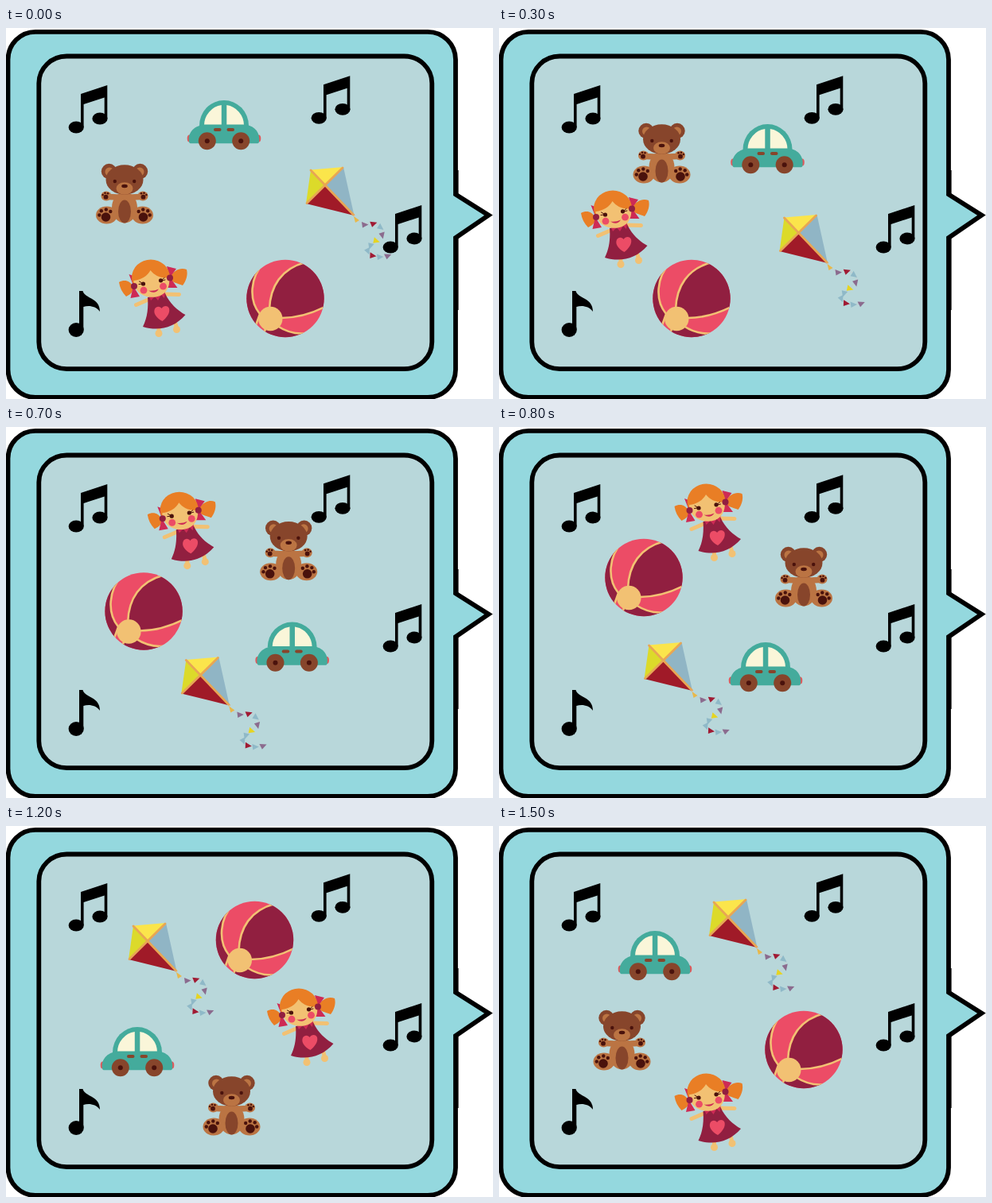
An HTML page that plays this animation: 612x467 px, repeating every 1.6 s.

```html
<!DOCTYPE html>
<html lang="en">
<head>
<meta charset="utf-8">
<title>Toys going round</title>
<style>
  html, body { margin: 0; width: 100%; height: 100%; overflow: hidden; background: #fff; }
  svg { display: block; width: 100vw; height: 100vh; }
  .teal { fill: #44ab9c } .cream { fill: #faf6d9 } .brown { fill: #87452b } .tan { fill: #bb7443 }
  .dark { fill: #4a120c } .hair { fill: #e97e25 } .skin { fill: #f2c173 } .wine { fill: #911f40 }
  .pink { fill: #ec4c66 } .bow { fill: #ce2a55 }
  .seam { stroke: #f2c173; stroke-width: 2.6 }
  .line { fill: none; stroke-linecap: round }
</style>
</head>
<body>
<svg viewBox="0 0 612 467" preserveAspectRatio="none">
  <defs>
    <clipPath id="disc"><circle cx="351" cy="340.5" r="48.7"/></clipPath>
    <g id="pair">
      <path d="M94 83L127.300 72V114H123.700V87.500L97.600 96V125H94Z"/>
      <ellipse cx="88.200" cy="125" rx="9.600" ry="7.400"/>
      <ellipse cx="118" cy="114" rx="9.600" ry="7.400"/>
    </g>
    <g id="paw">
      <ellipse class="tan" cx="126" cy="211.500" rx="6.500" ry="6"/>
      <circle class="dark" cx="125.500" cy="212.700" r="2.900"/>
      <circle class="dark" cx="121.600" cy="210" r="1.300"/>
      <circle class="dark" cx="124.500" cy="207.800" r="1.300"/>
      <circle class="dark" cx="128" cy="208.300" r="1.300"/>
      <ellipse class="tan" cx="126.500" cy="235.500" rx="13.500" ry="11"/>
      <circle class="dark" cx="125.500" cy="238" r="5.800"/>
      <circle class="dark" cx="117.300" cy="235.500" r="2.200"/>
      <circle class="dark" cx="119.800" cy="230.300" r="2.200"/>
      <circle class="dark" cx="125.800" cy="228.500" r="2.200"/>
      <circle class="dark" cx="131.300" cy="231" r="2.200"/>
      <circle class="brown" cx="129.500" cy="180.500" r="9.700"/>
      <circle class="tan" cx="130" cy="181" r="5.500"/>
    </g>
  </defs>

  <g stroke="#000" stroke-width="5.800">
    <path fill="#94d8de" d="M37 4.800H530A35 35 0 0 1 565 39.800V209.500L606.500 235.700L565 264V430A35 35 0 0 1 530 465H37A34.500 35 0 0 1 2.500 430V39.800A34.500 35 0 0 1 37 4.800Z"/>
    <path stroke-width="1.200" d="M568 179V210M568 265V355"/>
    <rect fill="#b8d7da" x="41.300" y="35.500" width="494" height="393.700" rx="35" ry="34"/>
  </g>

  <g id="car">
    <path class="teal" d="M243 123A31 32 0 0 1 305 123Z"/>
    <path class="cream" d="M249 122.500A25.500 26 0 0 1 270.800 97V122.500ZM277.300 97A25.500 26 0 0 1 299 122.500H277.300Z"/>
    <ellipse cx="230.500" cy="139" rx="2.800" ry="4.500" fill="#e0585b"/>
    <ellipse cx="317.500" cy="139" rx="2.800" ry="4.500" fill="#e0585b"/>
    <path class="teal" d="M230 143C228 131 238 121.500 252 121.500H298C311 121.500 320 131 318 143Q318 145.300 315 145.300H233Q230 145.300 230 143Z"/>
    <rect class="brown" x="261" y="126" width="9.500" height="4" rx="2"/>
    <rect class="brown" x="277.500" y="126" width="9.500" height="4" rx="2"/>
    <circle class="brown" cx="252.800" cy="142.300" r="11"/><circle class="dark" cx="252.800" cy="142.300" r="3"/>
    <circle class="brown" cx="295.200" cy="142.300" r="11"/><circle class="dark" cx="295.200" cy="142.300" r="3"/>
  </g>

  <g id="bear">
    <path class="line" stroke="#bb7443" stroke-width="7.500" d="M129 212.500Q149 214 169 212.500"/>
    <ellipse class="tan" cx="149" cy="226" rx="16" ry="19.500"/>
    <ellipse class="brown" cx="149" cy="231" rx="8" ry="14.500"/>
    <use href="#paw"/>
    <use href="#paw" transform="matrix(-1 0 0 1 298 0)"/>
    <ellipse class="brown" cx="149" cy="191" rx="23.500" ry="18.700"/>
    <ellipse class="tan" cx="149" cy="202" rx="10.500" ry="7.800"/>
    <ellipse class="dark" cx="149" cy="199" rx="3.800" ry="2.200"/>
    <circle class="dark" cx="136.800" cy="193" r="2.200"/>
    <circle class="dark" cx="161.200" cy="193" r="2.200"/>
  </g>

  <g id="doll">
    <path class="hair" d="M160 326C156 318 149 316 142 320C143 327 146 333 151 338C157 335 160 332 160 326ZM206 314C211 304 220 301 227 304C229 311 226 319 222 324C215 321 208 321 206 314Z"/>
    <path class="bow" d="M160 324L154.500 310L168 315ZM160 325L156.500 340L168 338ZM206 314L202 300L214 303ZM206 314L203 327L215.500 327Z"/>
    <path class="line" stroke="#f2c173" stroke-width="5" d="M181 341L163.500 348.500M199 335L217.500 335.500M192 376V385M213 372L215 380"/>
    <ellipse class="skin" cx="192" cy="384.500" rx="4.500" ry="4.500"/>
    <ellipse class="skin" cx="214.500" cy="379.500" rx="4.500" ry="4.500"/>
    <path class="wine" d="M178 339L200 334C205 346 216 356 225.500 361C211 378 191 382 172 376C178 364 179 351 178 339Z"/>
    <path class="bow" d="M179 336L182 343L187 338L191 343L195 336L199 340L200 332Z"/>
    <ellipse class="hair" cx="182" cy="314" rx="24" ry="22.500"/>
    <path class="skin" d="M160.500 318C170 317 178 312 181.500 305C187 312 196 316 205 314C207 329 198 338.500 184.500 338.800C171 339 161 331 160.500 318Z"/>
    <circle class="wine" cx="161" cy="325" r="4"/>
    <circle class="wine" cx="206" cy="314.500" r="4"/>
    <path class="line" stroke="#4a120c" stroke-width="1" d="M171 321L167.500 319M171 322L167 322.500M196 317L199 314.500M196 318L200 317"/>
    <circle class="dark" cx="172.500" cy="322" r="2.600"/>
    <circle class="dark" cx="194.500" cy="317.800" r="2.600"/>
    <circle class="pink" cx="173" cy="330.200" r="4.400"/>
    <circle class="pink" cx="197.500" cy="325.200" r="4.400"/>
    <path class="bow" d="M179 330.500Q186 331.500 192 328.500Q187 336 179 330.500Z"/>
    <path class="pink" d="M196.500 369C189 365 184.500 359 187 353.500C189 349.500 194 350 195.500 353C198 349 203.500 349 205 353C206.500 359 201.500 365 196.500 369Z"/>
  </g>

  <g id="ball" clip-path="url(#disc)">
    <rect class="pink" x="300" y="290" width="102" height="102"/>
    <g class="wine seam">
      <path d="M325 294C306 314 305 343 319 360L314 374L290 360V290Z"/>
      <path d="M331 354C332 325 346 303 376 295L410 285V346C386 360 364 365 346 365Z"/>
      <path d="M341 375C353 383 367 387 384 383L370 400H318L326 379Z"/>
    </g>
    <circle class="skin" cx="332.300" cy="366" r="15.200"/>
  </g>

  <g id="kite">
    <path fill="#fbe54b" d="M383 178.500L424 175L401 198Z"/>
    <path fill="#dcda2a" d="M383 178.500L401 198L377 221Z"/>
    <path fill="#90b5c5" d="M424 175L437.500 236L401 198Z"/>
    <path fill="#a01a28" d="M401 198L437.500 236L377 221Z"/>
    <path class="line" stroke="#e8a654" stroke-width="2.800" d="M383 179L437 235.500M423 176L378 220.500"/>
    <path class="line" stroke="#c5cdd0" stroke-width="1" d="M437 236L442 243C452 249 460 243 469 248C482 257 464 267 458 274C449 287 466 291 483 286"/>
    <path fill="#e8b84a" d="M437 237L444 242L439 245Z"/>
    <g id="flags"></g>
  </g>

  <g>
    <use href="#pair"/>
    <use href="#pair" x="305" y="-11.700"/>
    <use href="#pair" x="395" y="151"/>
    <ellipse cx="88.200" cy="380" rx="9.600" ry="9"/>
    <path d="M92 331H96.500C99 341 118 339 118 357C113 350 104 349 97.300 351V380H92Z"/>
  </g>
</svg>

<script>
const $ = id => document.getElementById(id);

// Pennants on the kite tail: x, y, turn, colour
const purple = '#8b6b8e', red = '#a01a33', blue = '#8fb9c8', yellow = '#e6d422';
$('flags').innerHTML = [
  [451, 247.5, 0, purple], [462, 246, -15, red], [471, 251, 40, blue], [473, 261, 80, purple],
  [465.5, 268, 20, yellow], [458, 274.5, 110, blue], [455, 281, 70, blue], [461, 286.5, 10, red],
  [470, 288, 0, blue], [480, 286.5, -20, purple]
].map(([x, y, a, c]) =>
  `<path fill="${c}" transform="translate(${x} ${y}) rotate(${a})" d="M-4 -3.500L4.500 0L-3 4Z"/>`).join('');

// Each toy circles clockwise round its centre, passing these points at the given steps
const marks = [0, 2, 4, 7, 9, 11, 14, 15];
const toys = {
  car: { c: [270, 240], p: [[274, 122], [337.5, 152], [373.5, 200.5], [335, 302], [246, 357], [165, 284], [196, 163]] },
  bear: { c: [265, 240], p: [[149, 209], [204.5, 158], [280, 128], [383, 189], [371, 288], [283.5, 352], [154.5, 270]] },
  doll: { c: [258, 240], p: [[185, 340], [146, 253], [163.5, 188.5], [263.5, 120], [364, 169], [371, 253], [263.5, 360]] },
  ball: { c: [283, 230], p: [[351, 340], [242, 340], [206, 311], [182, 189], [263.5, 121], [312.5, 143], [383, 281]] },
  kite: { c: [280, 187], p: [[424, 175], [399.5, 235], [354.5, 273], [229.5, 271], [145, 170], [201, 122], [311, 92]] }
};
const TAU = Math.PI * 2;

function place({ c, p }, step) {
  const i = marks.findIndex((m, k) => step < marks[k + 1]);
  const f = (step - marks[i]) / (marks[i + 1] - marks[i]);
  const [a, b] = [p[i], p[(i + 1) % p.length]].map(([x, y]) => {
    const dx = x - c[0], dy = y - c[1];
    return { r: Math.hypot(dx, dy), t: Math.atan2(dy, dx) };
  });
  const t = a.t + f * ((b.t - a.t + TAU) % TAU), r = a.r + f * (b.r - a.r);
  return [c[0] + r * Math.cos(t), c[1] + r * Math.sin(t)];
}

function draw(ms) {
  const tick = Math.floor(ms % 1600 / 100);
  const step = tick < 2 ? tick : tick - 1; // the second pose is held for two ticks
  for (const id in toys) {
    const [x, y] = place(toys[id], step), [x0, y0] = toys[id].p[0];
    $(id).setAttribute('transform', `translate(${(x - x0).toFixed(2)} ${(y - y0).toFixed(2)})`);
  }
}

let start;
function loop(now) {
  start ??= now;
  draw(now - start);
  requestAnimationFrame(loop);
}
draw(0);
requestAnimationFrame(loop);
</script>
</body>
</html>
```
